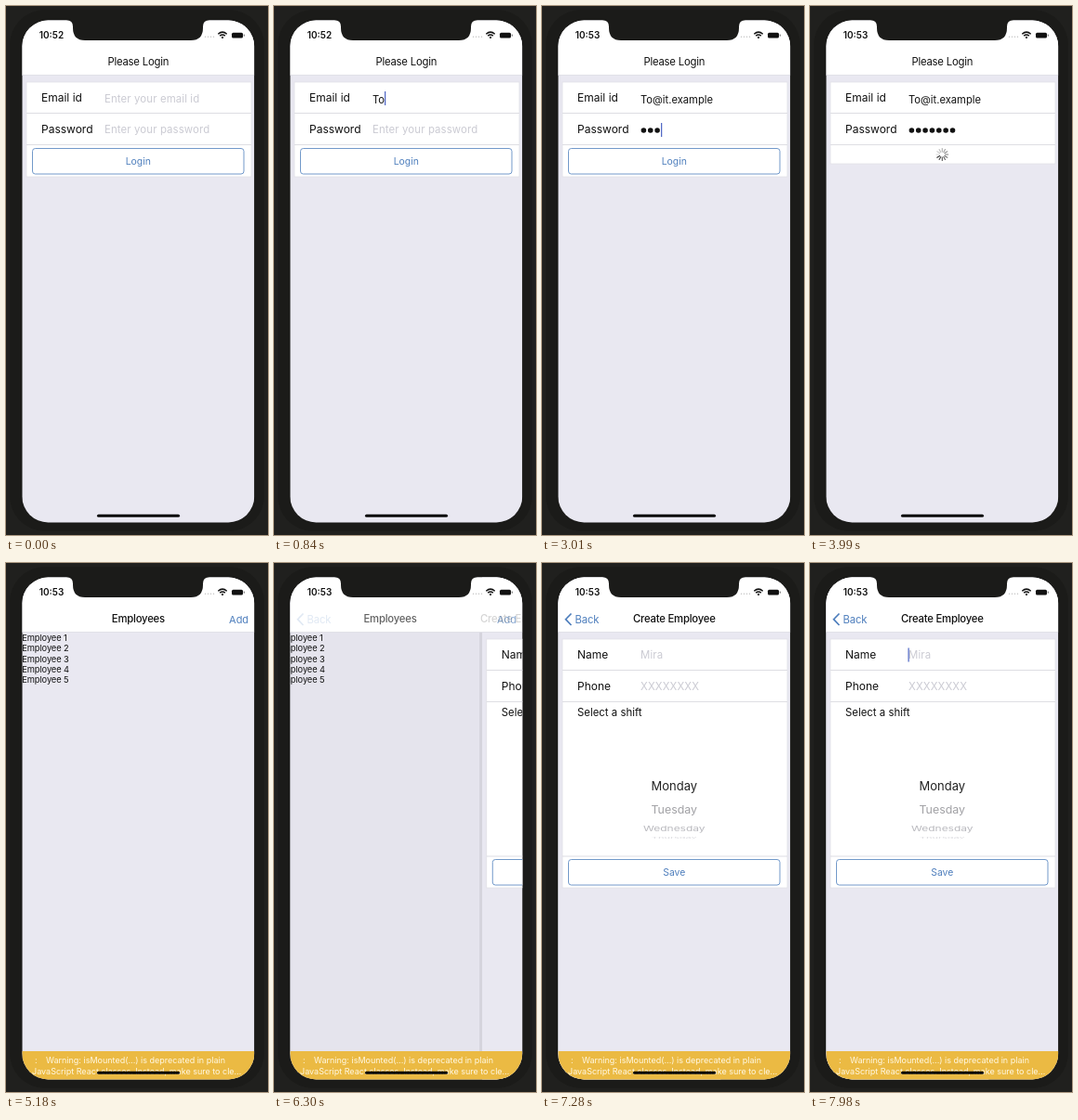
An HTML page that plays this animation: 282x570 px, repeating every 8000 ms.

```html
<!DOCTYPE html>
<html lang="en">
<head>
<meta charset="utf-8">
<style>
html, body { margin: 0; width: 100%; height: 100%; overflow: hidden; background: #20201e; }
svg { display: block; width: 282px; height: 570px; font-family: Inter, "Liberation Sans", sans-serif; white-space: pre; }
</style>
</head>
<body>
<svg id="stage" viewBox="0 0 282 570"></svg>
<script>
const LOOP = 8000;
const BLUE = '#4f7fbd', HINT = '#cbcbd3', GREY = '#e9e8f1';
const LOGIN_AT = 3820, LIST_AT = 4560, FORM_AT = 6260;
const EMAIL = 'To@it.example';
const INPUT = 11.2;

const stage = document.getElementById('stage');
const ruler = document.createElement('canvas').getContext('2d');
ruler.font = `${INPUT}px Inter, "Liberation Sans", sans-serif`;

const text = (s, x, y, size, fill = '#111', more = '') =>
  `<text x="${x}" y="${y}" font-size="${size}" fill="${fill}" ${more}>${s}</text>`;
const centred = (s, y, size, fill, more = '') =>
  text(s, 142.3, y, size, fill, `text-anchor="middle" ${more}`);
const rect = (x, y, w, h, fill, more = '') =>
  `<rect x="${x}" y="${y}" width="${w}" height="${h}" fill="${fill}" ${more}/>`;
const group = (dx, body, opacity = 1) =>
  `<g transform="translate(${dx.toFixed(2)} 0)" opacity="${opacity.toFixed(3)}">${body}</g>`;
const repeat = (n, fn) => Array.from({ length: n }, (_, i) => fn(i)).join('');

const title = (s, weight = 500) =>
  centred(s, 64.3, 11.3, '#111', `font-weight="${weight}" letter-spacing="-.2"`);
const label = (s, y, size = 12) => text(s, 38, y, size);
const hint = (s, y) => text(s, 106, y, 11.4, HINT, 'letter-spacing=".12"');
const cursor = (x, y) => rect(x, y, 1.2, 15, '#4b63c4');
const line = y => rect(22, y, 242, 1, '#dedee3');
const page = rect(17.3, 15, 250, 542, GREY);
const header = rect(17.3, 15, 250, 59.5, '#fff') + rect(17.3, 74, 250, .7, '#dadae1');
const card = bottom =>
  rect(22, 82, 242, bottom - 82, '#fff', 'stroke="#dedee4" stroke-width=".7"') + line(115) + line(149);
const button = (s, y) =>
  rect(28.5, y, 227.5, 27.5, '#fff', `rx="3" stroke="${BLUE}" stroke-width=".8"`) +
  centred(s, y + 17.6, 10.4, BLUE);

// Remaining share of a critically damped slide
function remaining(t, start) {
  const k = Math.max(0, t - start) * .01826;
  return (1 + k) * Math.exp(-k);
}
const typed = (t, start, step, max) =>
  Math.max(0, Math.min(max, Math.floor((t - start) / step) + 1));

function spinner(t) {
  const head = (Math.floor(t / 83.3) + 9) % 12;
  return repeat(12, i => `<path d="M142.3 157V153.600" stroke="#333" stroke-width="1.1" stroke-linecap="round"
    opacity="${1 - .075 * ((head - i + 12) % 12)}" transform="rotate(${i * 30} 142.3 160)"/>`);
}

function loginScreen(t) {
  const email = EMAIL.slice(0, typed(t, 690, 130, EMAIL.length));
  const dots = typed(t, 2640, 140, 7);
  const busy = t >= LOGIN_AT;
  let s = page + header + title('Please Login', 400) + card(busy ? 170 : 184);
  s += label('Email id', 103.3) + label('Password', 137.3);
  s += email ? text(email, 106, 104.5, INPUT) : hint('Enter your email id', 103.5);
  s += dots ? repeat(dots, i => `<circle cx="${109.4 + i * 7.35}" cy="134" r="2.8" fill="#111"/>`)
            : hint('Enter your password', 137.3);
  if (t >= 520 && t < 2450) s += cursor(106 + ruler.measureText(email).width, 92);
  if (t >= 2450 && !busy) s += cursor(106 + dots * 7.35, 126);
  return s + (busy ? spinner(t) : button('Login', 153.5));
}

const listBody = page +
  repeat(5, i => text('Employee ' + (i + 1), 17.3, 84 + i * 11.25, 9.3, '#111', 'letter-spacing="-.1"'));

const add = text('Add', 240, 64.5, 11, BLUE);

const back = `<path d="M31.5 54.5 25.5 60.7 31.5 67" fill="none" stroke="${BLUE}" stroke-width="1.7"/>` +
  text('Back', 35.5, 64.5, 11.3, BLUE, 'letter-spacing="-.15"');

// Picker row, flattened towards the rim of the wheel
const wheelRow = (s, y, size, fill, squash) =>
  `<g transform="translate(0 ${y}) scale(1 ${squash})">${centred(s, size * .36, size, fill)}</g>`;

const formBody = page + card(350) +
  label('Name', 103.3) + label('Phone', 137.3) + label('Select a shift', 165, 11.4) +
  hint('Mira', 103.3) + hint('XXXXXXXX', 137.3) +
  wheelRow('Monday', 240, 13, '#222', 1) +
  wheelRow('Tuesday', 266, 12.4, '#a0a0a4', .92) +
  wheelRow('Wednesday', 286.3, 12, '#b9b9be', .65) +
  wheelRow('Thursday', 296.5, 11, '#dcdce0', .2) +
  line(315.5) + button('Save', 319.5);

function employeeScreens(t) {
  const p = remaining(t, FORM_AT), moving = t >= FORM_AT, gone = 1 - p;
  let s = group(-75 * gone, listBody);
  if (moving) {
    s += rect(17.3, 74.7, 250, 482, '#000', `opacity="${(.08 * gone).toFixed(3)}"`);
    s += group(250 * p, rect(14.3, 74.7, 3, 482, '#000', 'opacity=".07"') + formBody);
  }
  s += header + group(-100 * gone, title('Employees'), Math.max(0, 1 - 2 * gone));
  s += group(0, add, Math.max(0, 1 - 2 * gone));
  if (moving) s += group(150 * p, title('Create Employee'), gone) + group(0, back, gone);
  if (t >= 7400) s += cursor(105.5, 91.5);
  return s;
}

const warningText = (s, x, y) => text(s, x, y, 9, '#fff8e4');
const warning = rect(17.3, 526, 250, 31, '#ebba43') +
  warningText(':', 31, 539.3) +
  warningText('Warning: isMounted(...) is deprecated in plain', 43, 539.3) +
  warningText('JavaScript React classes. Instead, make sure to cle…', 28, 550.6);

const statusIcons =
  repeat(4, i => `<circle cx="${214.5 + i * 3}" cy="33.2" r=".65" fill="#bbb"/>`) +
  `<g fill="none" stroke="#111" stroke-width="1.5">
    <path d="M228.3 30.2Q233 26 237.7 30.2M230.2 32.2Q233 29.9 235.8 32.2"/></g>
   <circle cx="233" cy="33.9" r="1.1" fill="#111"/>` +
  rect(243, 28.8, 12, 5.6, '#111', 'rx="1.5"') + rect(255.7, 30.5, 1.2, 2.2, '#777', 'rx=".6"');

const body = rect(0, 0, 282, 570, '#20201e') + rect(4, 4, 274, 562, '#1b1b19', 'rx="38"');
const clip = `<clipPath id="screen">${rect(17.3, 15.6, 250, 540.8, '#fff', 'rx="28"')}</clipPath>`;
const notch = '<path d="M65 15q7 .5 7 7v1.500q0 13.500 13 13.500H199q13 0 13-13.500v-1.500q0-6.500 7-7z" fill="#1b1b19"/>';
const homeBar = rect(98, 547.7, 89, 3, '#050505', 'rx="1.5"');

function render(t) {
  let s = '';
  if (t < LIST_AT) s = loginScreen(t);
  else {
    const p = remaining(t, LIST_AT);
    if (p > .001) s = group(-75 * (1 - p), loginScreen(t));
    s += group(250 * p, employeeScreens(t));
    if (t >= 4900) s += warning;
  }
  s += text(t < 3000 ? '10:52' : '10:53', 35.8, 35, 10, '#111', 'font-weight="600"');
  stage.innerHTML = clip + body + `<g clip-path="url(#screen)">${s}${statusIcons}${homeBar}</g>` + notch;
}

const begin = performance.now();
function tick() {
  render((performance.now() - begin) % LOOP);
  requestAnimationFrame(tick);
}
tick();
</script>
</body>
</html>
```
